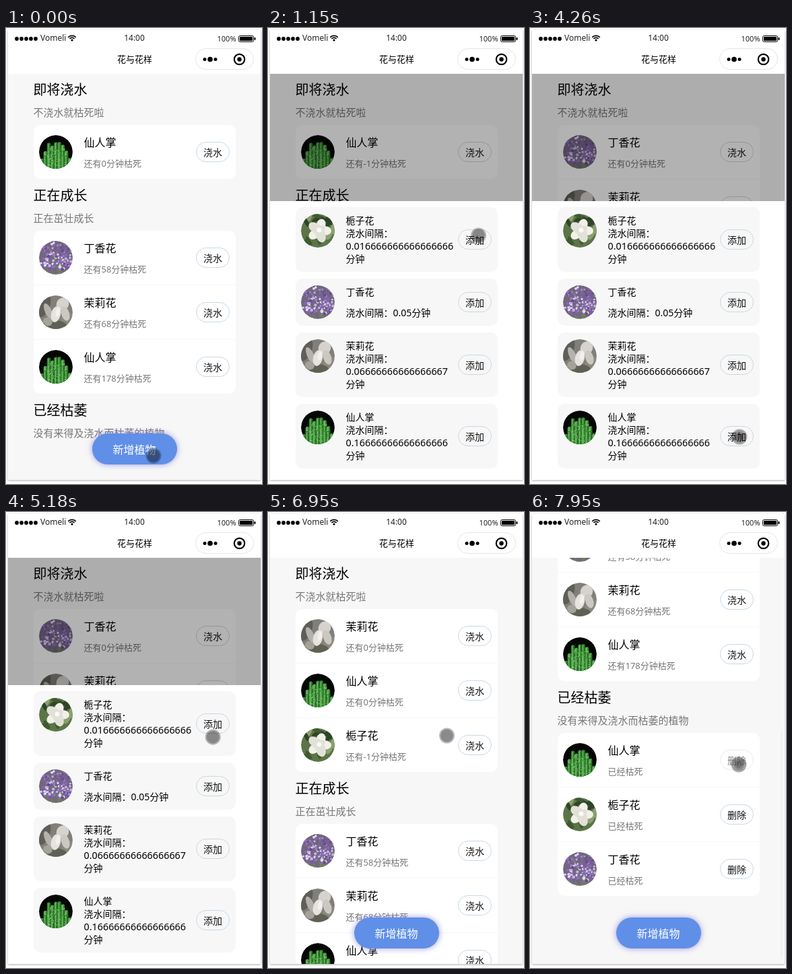
Recreate the animation shown at these times as an HTML page. Size 380 by 677 pixels, loop 8000 ms.

```html
<!DOCTYPE html>
<html lang="zh-CN">
<head>
<meta charset="utf-8">
<title>花与花样</title>
<style>
html, body { margin: 0; width: 100%; height: 100%; overflow: hidden; background: #fff; }
svg { display: block; width: 100%; height: 100%; }
text { font-family: "Noto Sans", "Noto Sans CJK SC", "Noto Sans CJK", sans-serif; font-weight: 350; }
text.strong { font-weight: 500; }
</style>
</head>
<body>
<svg id="stage" viewBox="0 0 380 677"></svg>
<script>
const LOOP = 8000;
const BG = '#f7f7f7';

// ---- small helpers ----
let seed = 7;
const rnd = (a, b) => {
  seed = (seed * 16807) % 2147483647;
  return a + (b - a) * seed / 2147483647;
};
const repeat = (n, fn) => Array.from({ length: n }, (_, i) => fn(i)).join('');
const clamp = v => Math.max(0, Math.min(1, v));
const smooth = p => p * p * (3 - 2 * p);
const easeOut = p => 1 - (1 - p) ** 3;
const span = (t, a, b) => clamp((t - a) / (b - a));
const within = (t, ranges) => ranges.some(([a, b]) => t >= a && t < b);

const rect = (x, y, w, h, r, fill, more = '') =>
  `<rect x="${x}" y="${y}" width="${w}" height="${h}" rx="${r}" fill="${fill}" ${more}/>`;
const dot = (x, y, r, fill, more = '') =>
  `<circle cx="${x}" cy="${y}" r="${r}" fill="${fill}" ${more}/>`;
const oval = (x, y, rx, ry, turn, fill) =>
  `<ellipse rx="${rx}" ry="${ry}" fill="${fill}" transform="translate(${x} ${y}) rotate(${turn})"/>`;
// cy is the middle of the line
const text = (x, cy, size, str, fill = '#000', more = '') =>
  `<text x="${x}" y="${cy + size * 0.37}" font-size="${size}" fill="${fill}" ${more}>${str}</text>`;
const MID = 'text-anchor="middle"';
const STRONG = 'class="strong"';

// ---- round plant pictures, centred on 0,0 ----
function cactus() {
  const greens = ['#2f7d2c', '#46a03d', '#3a8f37'];
  const stem = (x, top, i) =>
    rect(x, top, 5.4, 40, 2.7, greens[i % 3]) +
    rect(x + 1.6, top + 1.5, 1, 38, 0.5, '#83c873') +
    rect(x + 4, top + 2, 0.8, 38, 0.4, '#1d5a20');
  // rows from back to front, each shorter and wider than the last
  return dot(0, 0, 25, '#050705') +
    repeat(3, row => repeat(5 + row * 2, i => {
      const x = (i - 2 - row) * 5.2 - 2.7;
      return stem(x, -15 + row * 8 + Math.abs(x) * 0.25 + rnd(-2, 4), i + row);
    })) +
    repeat(45, () => dot(rnd(-17, 17), rnd(-6, 22), 0.6, '#b4dfa6'));
}
function lilac() {
  const tones = ['#7a5aa6', '#9a7cc4', '#c4b2de', '#694a92', '#e4dcef', '#8668b4'];
  return dot(0, 0, 25, '#72677f') +
    repeat(12, () => oval(rnd(-22, 22), rnd(4, 24), 1.6, 7, rnd(-30, 30), '#6e7d5c')) +
    repeat(170, i => dot(rnd(-24, 24), rnd(-24, 18), rnd(1, 2.5), tones[i % 6]));
}
function jasmine() {
  return dot(0, 0, 25, '#807f79') +
    oval(-18, -10, 9, 18, 20, '#5d5f58') +
    oval(17, 12, 9, 13, 0, '#8b897f') +
    oval(-2, 20, 18, 8, 0, '#5f6155') +
    oval(-11, -1, 5, 13, -24, '#b5b1ac') +
    oval(10, -12, 9, 10, 30, '#d6d2ce') +
    oval(14, 2, 6, 11, -18, '#cbc7c1') +
    oval(0, 3, 7, 12, 14, '#e6e3de') +
    oval(-12, 14, 7, 6, 20, '#a5a299') +
    oval(3, 0, 3, 7, 10, '#f2f0ec');
}
function gardenia() {
  const petal = (i, r, size) =>
    oval(2 + r * Math.cos(i * 1.25), r * Math.sin(i * 1.25), size, size * 0.75, i * 72, i % 2 ? '#e2e1d8' : '#f1f0e9');
  return dot(0, 0, 25, '#5c7548') +
    repeat(22, i => oval(rnd(-22, 22), rnd(-22, 22), 7, 3, rnd(0, 180), ['#405a30', '#8ba070', '#2f4528'][i % 3])) +
    repeat(5, i => petal(i, 9, 9)) +
    repeat(5, i => petal(i + 0.5, 4, 6)) +
    dot(2, -1, 3.5, '#fbfaf4');
}
const ART = { 仙人掌: cactus, 丁香花: lilac, 茉莉花: jasmine, 栀子花: gardenia };
const picture = (name, y) => `<use href="#${name}" x="74" y="${y}"/>`;

// ---- page parts ----
const button = (label, y, id = '') =>
  `<g id="${id}">` +
  rect(282.5, y - 14.5, 49, 29, 14.5, 'none', 'stroke="#c8d8e6"') +
  text(307, y + 0.5, 14, label, '#111', MID) + '</g>';

function section(top, title, note, rows, action) {
  let out = text(40.5, top + 25, 20, title) +
    text(40.5, top + 58, 15, note, '#777', STRONG);
  const y0 = top + 77;
  if (!rows.length) return { out, end: y0 };
  const h = rows.length * 81 - 1;
  out += rect(41, y0, 300, h, 10, '#fff');
  rows.forEach(([name, state], i) => {
    const y = y0 + i * 81;
    if (i) out += rect(41, y - 1, 300, 1, 0, BG);
    out += picture(name, y + 40) +
      text(115.5, y + 26, 16, name) +
      text(115.5, y + 57, 13, state, '#777') +
      button(action, y + 40, action === '删除' && !i ? 'remove' : '');
  });
  return { out, end: y0 + h };
}

const left = (name, min) => [name, `还有${min}分钟枯死`];
const GROWING = [left('丁香花', 58), left('茉莉花', 68), left('仙人掌', 178)];

// [start, plants about to wither, number of withered plants]
const STATES = [
  [0, [left('仙人掌', 0)], 0],
  [700, [left('仙人掌', -1)], 0],
  [1700, [left('栀子花', 0)], 1],
  [2700, [left('丁香花', 0)], 2],
  [3710, [left('丁香花', 0), left('茉莉花', 0)], 2],
  [5700, [left('茉莉花', 0), left('仙人掌', 0), left('栀子花', 0)], 3],
  [6700, [left('茉莉花', 0), left('仙人掌', 0), left('栀子花', -1)], 3]
];

function page([, soon, gone]) {
  const dead = ['仙人掌', '栀子花', '丁香花'].slice(0, gone).map(n => [n, '已经枯死']);
  const a = section(67, '即将浇水', '不浇水就枯死啦', soon, '浇水');
  const b = section(a.end, '正在成长', '正在茁壮成长', GROWING, '浇水');
  const c = section(b.end, '已经枯萎', '没有来得及浇水而枯萎的植物', dead, '删除');
  return a.out + b.out + c.out;
}

function sheet() {
  const cards = [
    ['栀子花', 266, 96, '0.016666666666666666'],
    ['丁香花', 372, 70, ''],
    ['茉莉花', 452, 96, '0.06666666666666667'],
    ['仙人掌', 558, 96, '0.16666666666666666']
  ];
  return rect(3, 257, 375, 414, 0, '#fff') + cards.map(([name, y, h, num], i) =>
    rect(41, y, 300, h, 10, BG) + picture(name, y + 35) +
    text(115.5, y + 20, 14, name) +
    (num
      ? text(115.5, y + 39, 14, '浇水间隔：') + text(115.5, y + 58, 14.35, num) + text(115.5, y + 77, 14, '分钟')
      : text(115.5, y + 51, 14, '浇水间隔：0.05分钟')) +
    button('添加', y + h / 2, 'add' + i)).join('');
}

function header() {
  const arc = r => `<path d="M${98 - r * 0.72} ${19.5 - r * 0.7}A${r} ${r} 0 0 1 ${98 + r * 0.72} ${19.5 - r * 0.7}" fill="none" stroke="#000" stroke-width="1.7"/>`;
  return rect(3, 3, 375, 65, 0, '#fff') +
    repeat(5, i => dot(16 + i * 7, 16, 2.9, '#000')) +
    text(51, 15, 12, 'Vomeli', '#222') +
    arc(8) + arc(5) + dot(98, 18, 1.6, '#000') +
    text(190.5, 15, 12, '14:00', '#222', MID) +
    text(313.5, 16, 11, '100%', '#222') +
    rect(345.5, 11.5, 22, 9, 2, 'none', 'stroke="#000"') +
    rect(347, 13, 19, 6, 0.5, '#000') +
    rect(368.5, 14, 2, 4, 1, '#000') +
    text(191, 46, 13, '花与花样', '#000', MID) +
    rect(281.5, 30.5, 86, 31, 15.5, '#fff', 'stroke="#e6e6e6"') +
    dot(295, 46.5, 2.5, '#000') + dot(303, 46.5, 3.8, '#000') + dot(311, 46.5, 2.5, '#000') +
    dot(346.5, 46.5, 7.7, 'none', 'stroke="#000" stroke-width="2.2"') +
    dot(346.5, 46.5, 3.2, '#000');
}

// ---- build ----
const stage = document.getElementById('stage');
stage.innerHTML = `<defs>
  <clipPath id="disc"><circle r="25"/></clipPath>
  <clipPath id="view"><rect x="3" y="68" width="375" height="603"/></clipPath>
  <filter id="lift" x="-5%" y="-5%" width="110%" height="110%"><feDropShadow dx="0" dy="1" stdDeviation="1.6" flood-opacity=".33"/></filter>
  <filter id="glow" x="-20%" y="-50%" width="140%" height="200%"><feDropShadow dx="0" dy="0" stdDeviation="5" flood-color="#7d78d8" flood-opacity=".75"/></filter>
  <radialGradient id="push"><stop offset=".3" stop-color="#000" stop-opacity=".56"/><stop offset="1" stop-color="#000" stop-opacity=".28"/></radialGradient>
  ${Object.entries(ART).map(([n, draw]) => `<g id="${n}" clip-path="url(#disc)">${draw()}</g>`).join('')}
</defs>
${rect(3, 3, 375, 668, 0, BG, 'filter="url(#lift)"')}
<g clip-path="url(#view)">
  <g id="list"></g>
  ${rect(372, 0, 3, 337, 1.5, '#000', 'id="bar" opacity="0"')}
  ${rect(128, 602, 126, 46, 23, '#608fe8', 'filter="url(#glow)"')}
  ${text(190.5, 626, 16, '新增植物', '#fff', `${MID} ${STRONG}`)}
  ${rect(3, 68, 375, 603, 0, '#000', 'id="mask"')}
  <g id="sheet">${sheet()}</g>
</g>
${header()}
<g id="touch">
  <g id="idle">${dot(0, 0, 11.5, '#000', 'opacity=".27"')}${dot(0, 0, 9.5, '#000', 'opacity=".25"')}</g>
  <g id="down">${dot(0, 0, 11.5, 'url(#push)')}</g>
</g>`;

const el = id => document.getElementById(id);
const set = (id, key, value) => { const e = el(id); if (e) e.setAttribute(key, value); };

// ---- timing ----
const PATH = [
  [0, 219, 635], [80, 219, 635], [150, 212, 635], [450, 212, 635], [1150, 312.5, 308],
  [1460, 312.5, 308], [1920, 312, 409], [2380, 312, 409], [2610, 315.5, 472], [2840, 313.5, 490],
  [3710, 313.5, 490], [4090, 311, 607], [4650, 311, 607], [5260, 307, 321], [5650, 307, 321],
  [6180, 293.5, 234], [6560, 293.5, 234], [6950, 265.5, 332], [7500, 265.5, 332], [7850, 310, 375], [LOOP, 310, 375]
];
const TAPS = [
  ['add0', [[1230, 1310], [5490, 5650]]],
  ['add1', [[2150, 2230]]],
  ['add2', [[3390, 3560]]],
  ['add3', [[4490, 4650]]],
  ['remove', [[7900, LOOP]]]
];
const PRESSES = [[1230, 1310], [2150, 2230], [3010, 3560], [4260, 4600], [5490, 5600], [6490, 6560], [7880, LOOP]];

function finger(t) {
  const i = Math.max(1, PATH.findIndex(p => p[0] > t));
  const [a, b] = [PATH[i - 1], PATH[i]];
  const p = smooth(span(t, a[0], b[0]));
  return [a[1] + (b[1] - a[1]) * p, a[2] + (b[2] - a[2]) * p];
}

let shown = null;
function draw(t) {
  const state = STATES.filter(s => s[0] <= t).pop();
  if (state !== shown) {
    el('list').innerHTML = page(state);
    shown = state;
  }
  const open = easeOut(span(t, 380, 700)) * (1 - smooth(span(t, 6490, 6800)));
  const scroll = smooth(span(t, 7300, 7720));
  set('list', 'transform', `translate(0 ${-454 * scroll})`);
  set('bar', 'y', 70 + 255 * scroll);
  set('bar', 'opacity', scroll > 0 ? 0.025 : 0);
  set('mask', 'opacity', 0.3 * open);
  set('sheet', 'transform', `translate(0 ${414 * (1 - open)})`);
  TAPS.forEach(([id, ranges]) => set(id, 'opacity', within(t, ranges) ? 0.5 : 1));

  const [x, y] = finger(t);
  const down = within(t, PRESSES);
  set('touch', 'transform', `translate(${x} ${y})`);
  set('idle', 'opacity', down ? 0 : 1);
  set('down', 'opacity', down ? 1 : 0);
}

const start = performance.now();
function tick() {
  draw((performance.now() - start) % LOOP);
  requestAnimationFrame(tick);
}
tick();
</script>
</body>
</html>
```
